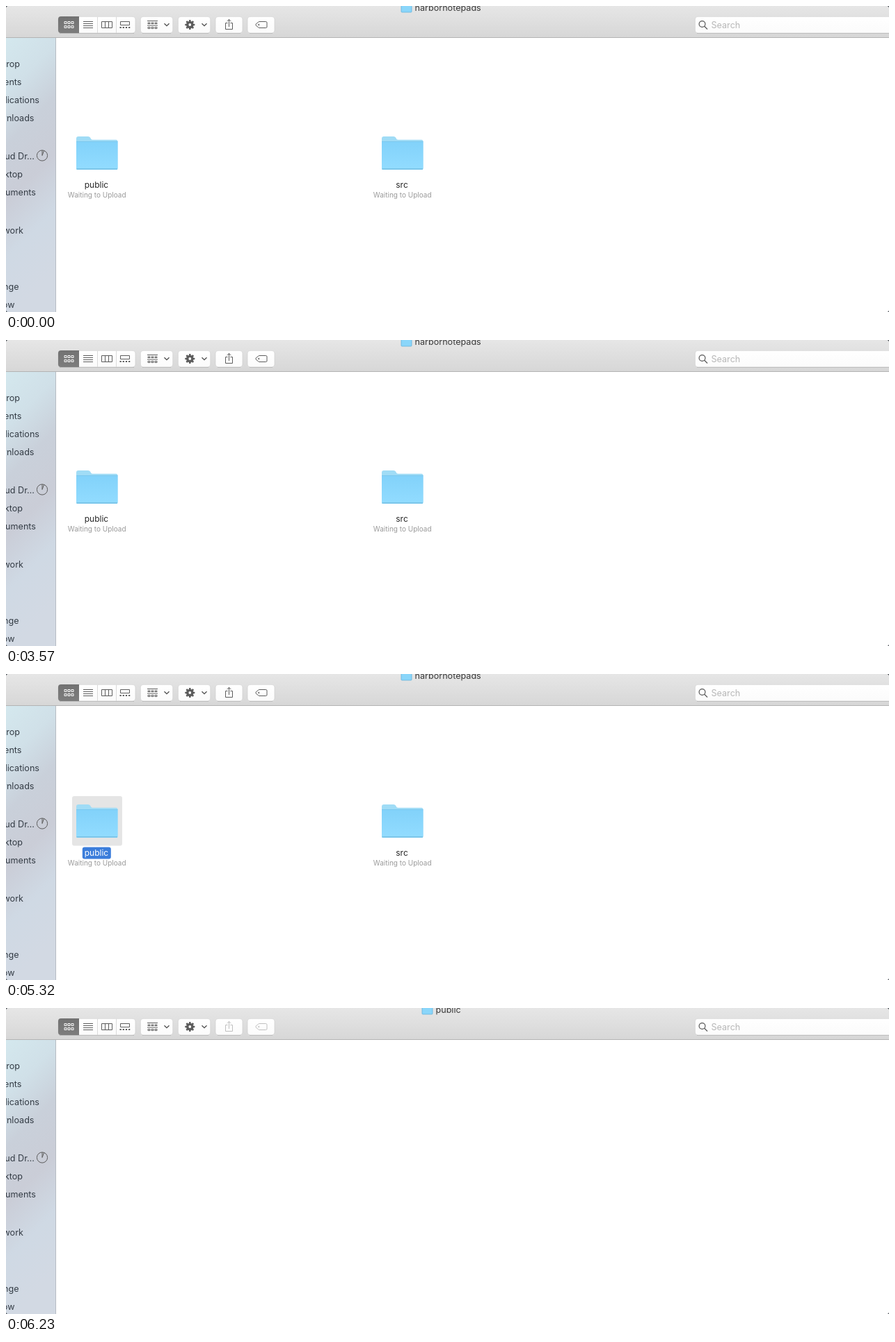
An HTML page that plays this animation: 1269 px wide and 441 px high, repeating every 8 s.

```html
<!DOCTYPE html>
<html lang="en">
<head>
<meta charset="utf-8">
<title>File browser</title>
<style>
  html, body { margin: 0; width: 100%; height: 100%; overflow: hidden; background: #fff; }
  svg { display: block; width: 100vw; height: 100vh; }
  text { font: 12.6px Inter, "Open Sans", sans-serif; fill: #3b3b3b; }
  .mid { text-anchor: middle; }
  .side text { text-anchor: end; fill: #343c45; }
  .label { font-size: 12px; fill: #262626; }
  .note { font-size: 10px; fill: #9a9a9a; }
  .icon { fill: none; stroke: #5c5c5c; stroke-width: 1; }
  .button { fill: url(#button); stroke: #c9c9c9; stroke-width: .6; }

  /* Select at 4830 ms, open at 5390 ms */
  .list, .select, .opened, .tools, .name { animation: 8s step-end infinite; }
  .list { animation-name: list; }
  .select { animation-name: select; }
  .opened { animation-name: opened; }
  .tools { animation-name: tools; }
  .name { animation-name: name; }
  @keyframes list { 0% { opacity: 1 } 67.375%, 100% { opacity: 0 } }
  @keyframes select { 0% { opacity: 0 } 60.375%, 100% { opacity: 1 } }
  @keyframes opened { 0% { opacity: 0 } 67.375%, 100% { opacity: 1 } }
  @keyframes tools { 0% { opacity: 1 } 67.375%, 100% { opacity: .38 } }
  @keyframes name { 0% { fill: #262626 } 60.375%, 100% { fill: #fff } }
</style>
</head>
<body>
<svg viewBox="0 0 1269 441" preserveAspectRatio="none">
  <defs>
    <linearGradient id="bar" x2="0" y2="1">
      <stop stop-color="#e6e6e6"/><stop offset="1" stop-color="#d7d7d7"/>
    </linearGradient>
    <linearGradient id="button" x2="0" y2="1">
      <stop stop-color="#fff"/><stop offset="1" stop-color="#fbfbfb"/>
    </linearGradient>
    <linearGradient id="pressed" x2="0" y2="1">
      <stop stop-color="#727272"/><stop offset="1" stop-color="#7d7d7d"/>
    </linearGradient>
    <linearGradient id="side" x2=".18" y2="1">
      <stop stop-color="#d4e8ee"/>
      <stop offset=".2" stop-color="#d0e0e8"/>
      <stop offset=".38" stop-color="#c9d0da"/>
      <stop offset=".58" stop-color="#cacdd7"/>
      <stop offset=".78" stop-color="#cfd9e4"/>
      <stop offset="1" stop-color="#d2d9e3"/>
    </linearGradient>
    <linearGradient id="front" x2="0" y2="1">
      <stop stop-color="#82d2fa"/><stop offset="1" stop-color="#92dcff"/>
    </linearGradient>
    <g id="folder">
      <path d="M101 191q0-3 3-3h14q2 0 3 1.5l1.5 2.5q.5 .7 2 .7H158q2.500 0 2.500 2.500V234q0 2-2 2H103q-2 0-2-2z" fill="#a0dcf6"/>
      <path d="M101 195.500h59.500V234q0 2-2 2H103q-2 0-2-2z" fill="url(#front)"/>
      <path d="M101 195.500h59.500" stroke="#76c5ec" stroke-width=".8"/>
      <path d="M101.500 234.800h58.500" stroke="#78c1e4" stroke-width="1.600"/>
    </g>
    <g id="mini">
      <rect width="15" height="12" y="-3" rx="1" fill="#8ad6fa" stroke="#62b2dc" stroke-width=".8"/>
    </g>
    <path id="chevron" d="M-3.500-1.700 0 1.700 3.500-1.700" fill="none" stroke="#4c4c4c" stroke-width="1.300"/>
    <rect id="tooth" x="-1.300" y="-7" width="2.600" height="4" rx=".6"/>
  </defs>

  <rect width="1269" height="441" fill="#fff"/>

  <g class="side">
    <rect y="45" width="71" height="396" fill="url(#side)"/>
    <path d="M71.500 45V441" stroke="#b6bcc3"/>
    <text x="20" y="88">Drop</text>
    <text x="22.500" y="114">Recents</text>
    <text x="48" y="140">Applications</text>
    <text x="40.500" y="166">Downloads</text>
    <text x="41" y="220.500">oud Dr…</text>
    <text x="24" y="246.500">Desktop</text>
    <text x="43" y="272.500">Documents</text>
    <text x="25" y="327.500">Network</text>
    <text x="18.500" y="408.500">Orange</text>
    <text x="12.500" y="434.500">Yellow</text>
    <g class="icon" stroke-width=".9">
      <circle cx="52" cy="215.500" r="7.600"/>
      <path d="M52 208v7.500l2.600-7"/>
    </g>
  </g>

  <rect width="1269" height="45" fill="url(#bar)"/>
  <path d="M0 45.500H1269" stroke="#b3b3b3"/>

  <g class="list">
    <use href="#mini" x="568"/>
    <text x="587.500" y="7">harbornotepads</text>
  </g>
  <g class="opened">
    <use href="#mini" x="598"/>
    <text x="617.500" y="7">public</text>
  </g>

  <g fill="none" stroke="#b9b9b9" stroke-width="1">
    <path d="M77 39.500H184M196 39.500H237M250 39.500H291M304 39.500H337M350 39.500H383M993 39.500H1269"/>
  </g>
  <g class="button">
    <rect x="75" y="15.300" width="111" height="23.700" rx="4"/>
    <rect x="193.300" y="15.300" width="46.500" height="23.700" rx="4"/>
    <rect x="247.300" y="15.300" width="46.500" height="23.700" rx="4"/>
    <rect x="301" y="15.300" width="39" height="23.700" rx="4"/>
    <rect x="347" y="15.300" width="39" height="23.700" rx="4"/>
    <rect x="990.300" y="15.300" width="290" height="23.700" rx="4"/>
  </g>
  <path d="M105 15H79q-4 0-4 4V35q0 4 4 4H105z" fill="url(#pressed)"/>
  <path d="M131.500 15.500V39M158.500 15.500V39" stroke="#dadada"/>

  <g class="icon">
    <path d="M84 22.500h3v3h-3zM89 22.500h3v3h-3zM94 22.500h3v3h-3zM84 28.500h3v3h-3zM89 28.500h3v3h-3zM94 28.500h3v3h-3z" stroke="#fff"/>
    <path d="M111 22.500h14M111 25.500h14M111 28.500h14M111 31.500h14"/>
    <path d="M137.500 22.500h15v9h-15zM142.500 22.500v9M147.500 22.500v9"/>
    <path d="M164.500 22.500h13v5h-13z"/>
    <path d="M163.500 31h15" stroke-width="2" stroke-dasharray="2.200 2"/>
    <path d="M203 21.500h15M203 28h15"/>
    <path d="M204 24h3v1.500h-3zM209 24h3v1.500h-3zM214 24h3v1.500h-3zM204 30.500h3v2h-3zM209 30.500h3v2h-3zM214 30.500h3v2h-3z"/>
  </g>
  <use href="#chevron" x="231" y="27"/>
  <use href="#chevron" x="285" y="27"/>

  <g transform="translate(264.300 27)" fill="#5c5c5c">
    <circle r="3.600" fill="none" stroke="#5c5c5c" stroke-width="3.400"/>
    <use href="#tooth"/>
    <use href="#tooth" transform="rotate(45)"/>
    <use href="#tooth" transform="rotate(90)"/>
    <use href="#tooth" transform="rotate(135)"/>
    <use href="#tooth" transform="rotate(180)"/>
    <use href="#tooth" transform="rotate(225)"/>
    <use href="#tooth" transform="rotate(270)"/>
    <use href="#tooth" transform="rotate(315)"/>
  </g>

  <g class="icon tools">
    <path d="M318.500 24.500H315.500V33.500H325.500V24.500H322.500M320.500 30V19.500M317.500 22.300 320.500 19.300 323.500 22.300"/>
    <path d="M363.500 22.500H373.500q1.500 0 1.500 1.500V30q0 1.500-1.500 1.500H363.500L359 27.800V26.200z"/>
    <circle cx="363.300" cy="27" r=".8"/>
  </g>

  <g fill="none" stroke="#555" stroke-width="1.200">
    <circle cx="1000.500" cy="26" r="4.400"/>
    <path d="M1003.700 29.300 1008 33.500"/>
  </g>
  <text x="1013.500" y="32" style="fill:#b7b7b7">Search</text>

  <g class="list">
    <g class="select">
      <rect x="95" y="176" width="72" height="71.500" rx="3" fill="#e5e5e5"/>
      <rect x="109.800" y="249.500" width="41" height="17" rx="3" fill="#3b7ddb"/>
    </g>
    <use href="#folder"/>
    <use href="#folder" x="439"/>
    <text class="label mid name" x="130" y="262.300">public</text>
    <text class="label mid" x="569" y="262.300">src</text>
    <text class="note mid" x="130.700" y="276.300">Waiting to Upload</text>
    <text class="note mid" x="569.700" y="276.300">Waiting to Upload</text>
  </g>

  <path d="M0 0h2.500Q.5 .5 0 2.500zM1269 0v2.500Q1268.500 .5 1266.500 0zM0 441v-2.500Q.5 440.500 2.500 441zM1269 441h-2.500Q1268.500 440.500 1269 438.500z" fill="#4a4f55"/>
</svg>
</body>
</html>
```
